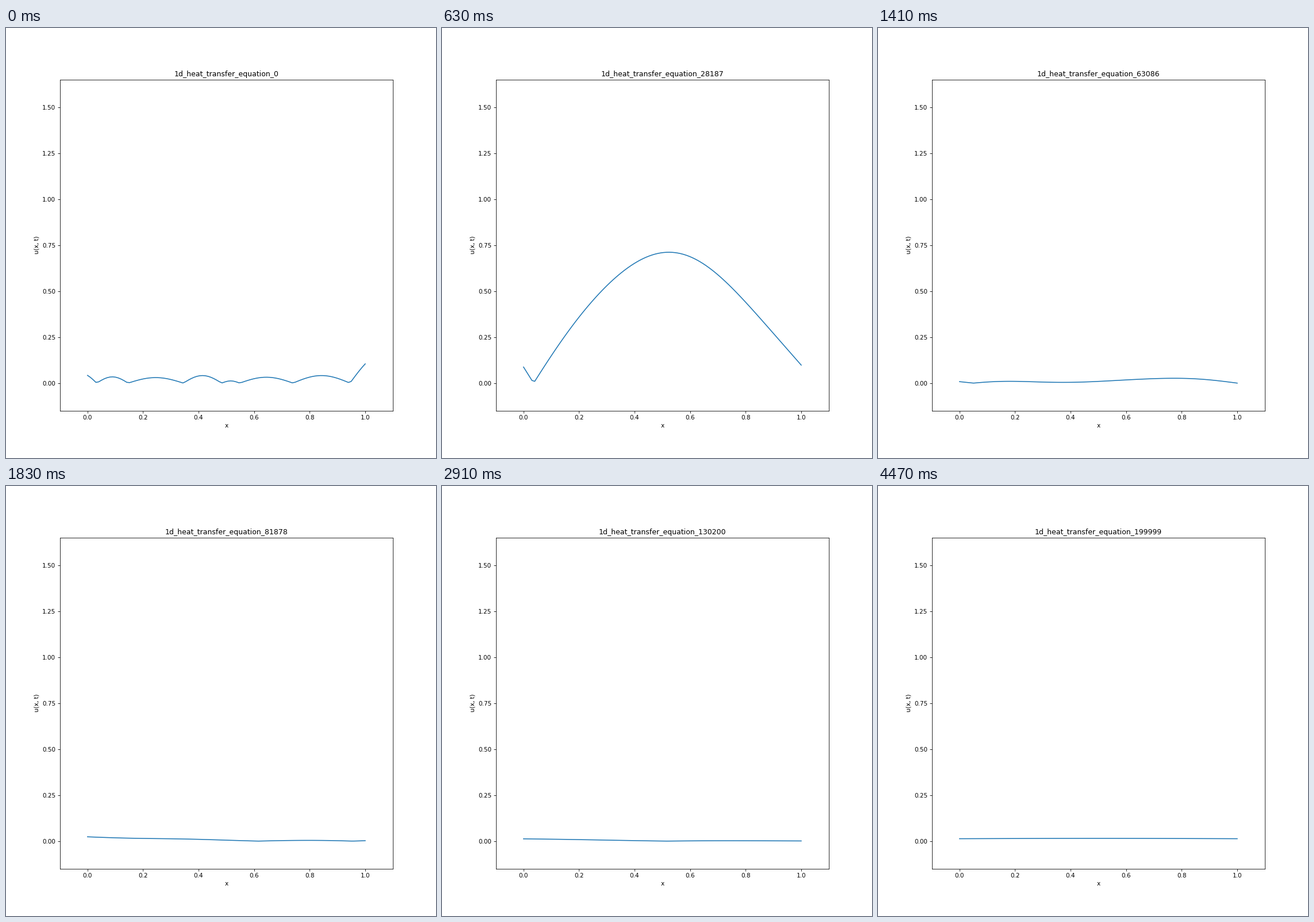
Recreate the animation shown at these times as a matplotlib script. Size 748x748 px, loop 4.5 s.

```python
import numpy as np
import matplotlib.pyplot as plt
from matplotlib.animation import FuncAnimation

FRAMES = 150
INTERVAL = 30
LAST_STEP = 199999
PEAK, TAU = 1.39, 7.93  # height and time of the early swell
T_SWELL, T_FADE, T_RIPPLE, T_TILT, T_ARCH = 12, 31, 47, 76, 119

x = np.linspace(0, 1, 100)


def modes(left, right, *amps):
    """Straight line between the end values plus a sine series."""
    waves = sum(a * np.sin(k * np.pi * x) for k, a in enumerate(amps, 1))
    return left + (right - left) * x + waves


def humps(zeros, heights):
    """Half sine waves of alternating sign between neighbouring zeros."""
    phase = np.interp(x, zeros, np.arange(len(zeros)))
    return np.sin(np.pi * phase) * np.array(heights)[phase.astype(int)]


# Signed profiles; the plot shows their absolute value.
start = humps([-.08, .033, .146, .345, .483, .548, .74, .945, 1.2],
              [.053, .034, .030, .041, .012, .032, .041, .167])
swell = modes(-.131, .162, 1.2245, .025, -.0243, .003, -.005)
fading = modes(-.043, .044, .2897, .0041, -.0047, .0051, .0021)
ripple = modes(-.008, 0, .0215, -.0071, .0096, .0016, .0014)
tilt = modes(-.029, -.003, .0049, -.002, -.0007)
arch = modes(.005, .005, .0052)
final = modes(.013, .013, .0019)


def envelope(t):
    return PEAK * t / TAU * np.exp(1 - t / TAU)


def progress(t, t0, t1):
    return min(max((t - t0) / (t1 - t0), 0), 1)


def ease_out(s, power):
    return 1 - (1 - s) ** power


def mix(a, b, s):
    return a + (b - a) * s


swell_shape = swell / envelope(T_SWELL)
fade_shape = fading / envelope(T_FADE)
remainder = ripple - fade_shape * envelope(T_RIPPLE)


def profile(t):
    if t <= T_SWELL:
        return start * (1 - t / T_SWELL) ** 2 + envelope(t) * swell_shape
    if t <= T_RIPPLE:
        shape = mix(swell_shape, fade_shape, progress(t, T_SWELL, T_FADE))
        s = progress(t, T_FADE, T_RIPPLE)
        return envelope(t) * shape + remainder * s * s * (3 - 2 * s)
    if t <= T_TILT:
        return mix(ripple, tilt, ease_out(progress(t, T_RIPPLE, T_TILT), 2))
    if t <= T_ARCH:
        return mix(tilt, arch, progress(t, T_TILT, T_ARCH))
    return mix(arch, final, ease_out(progress(t, T_ARCH, FRAMES - 1), 1.7))


fig, ax = plt.subplots(figsize=(10, 10), dpi=74.8)
line, = ax.plot(x, np.abs(start))
ax.set_xlim(-0.1, 1.1)
ax.set_ylim(-0.15, 1.65)
ax.set_yticks(np.arange(0, 1.6, 0.25))
ax.set_xlabel("x")
ax.set_ylabel("u(x, t)")


def update(i):
    line.set_ydata(np.abs(profile(i)))
    ax.set_title(f"1d_heat_transfer_equation_{i * LAST_STEP // (FRAMES - 1)}")
    return line,


anim = FuncAnimation(fig, update, frames=FRAMES, interval=INTERVAL,
                     repeat=True, repeat_delay=0)
plt.show()
```
